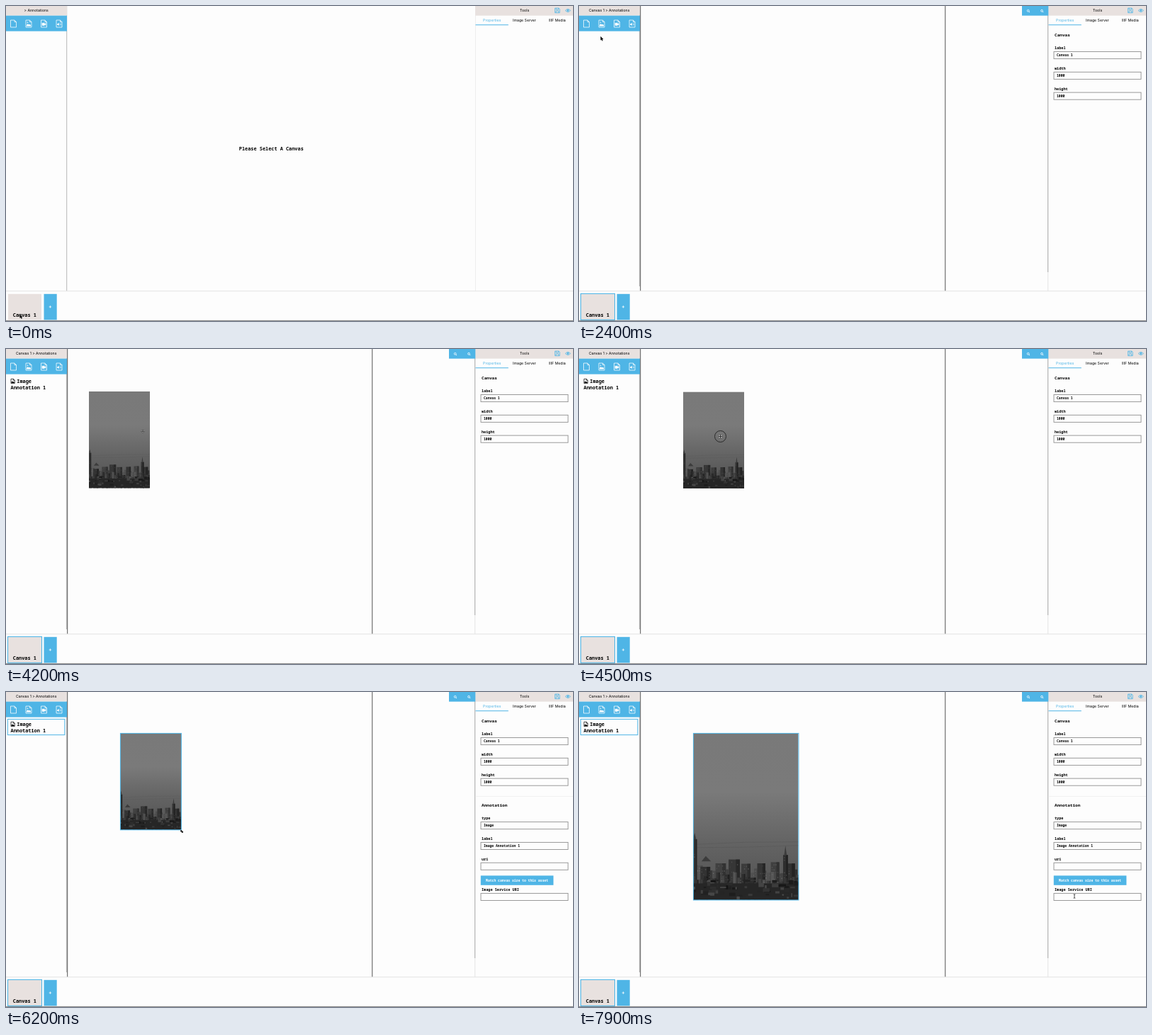
Recreate the animation shown at these times as an HTML page. Size 800 px wide and 445 px high, loop 8000 ms.

```html
<!DOCTYPE html>
<html lang="en">
<head>
<meta charset="utf-8">
<title>Canvas editor</title>
<style>
  html, body { margin: 0; width: 100%; height: 100%; overflow: hidden; background: #fdfdfd; }
  svg { display: block; }
  text { font-family: "Noto Sans Mono", "DejaVu Sans Mono", monospace; font-weight: 600; white-space: pre; }
  .ui { font: 400 5.2px Inter, Roboto, sans-serif; text-anchor: middle; }
  .big { font-size: 6.9px; }
  .head { font-size: 6.05px; }
  .label { font-size: 5.2px; }
  .value { font-size: 4.73px; }
  .mid { text-anchor: middle; }
  .blue { fill: #4fb5e6; }
  .bar { fill: #e8e1df; }
  .line { fill: none; stroke: #4fb5e6; }
  .icon { fill: none; stroke: #fff; stroke-width: .75; stroke-linejoin: round; }
  .solid { fill: #fff; stroke: none; }
  .box { fill: #fdfdfd; stroke: #8f8f8f; stroke-width: .9; }
</style>
</head>
<body>
<svg width="800" height="445" viewBox="0 0 800 445">
  <defs>
    <linearGradient id="sky" x1="0" y1="0" x2="0" y2="1">
      <stop offset="0" stop-color="#797979"/>
      <stop offset=".35" stop-color="#7a7a7a"/>
      <stop offset=".65" stop-color="#646464"/>
      <stop offset="1" stop-color="#505050"/>
    </linearGradient>
    <path id="file" d="M-4-5H1.5L4-2.5V5H-4ZM1.5-5V-2.5H4"/>
    <g id="lens"><circle r="1.4" cx="-.3" cy="-.3" fill="none" stroke="#fff" stroke-width=".8"/><path d="M.7.7L2 2" stroke="#fff" stroke-width=".9"/></g>
  </defs>
  <rect width="800" height="445" fill="#fdfdfd"/>

  <g id="idle">
    <rect x="85" width="1.2" height="402.5" fill="#c4c4c4"/>
    <rect x="662" width=".6" height="402.5" fill="#e4e4e4"/>
    <text class="big mid" x="374.3" y="204">Please Select A Canvas</text>
  </g>
  <g id="open">
    <rect x="84.8" width="1.2" height="396" fill="#bdbdbd"/>
    <rect x="86.1" width="1.1" height="402.5" fill="#636363"/>
    <rect x="516.2" width="1.1" height="402.5" fill="#636363"/>
    <rect x="661.2" width="1" height="376" fill="#a6a6a6"/>
    <rect x="661.4" y="376" width=".8" height="26.5" fill="#dedede"/>
  </g>

  <rect class="bar" width="86" height="13.6"/>
  <text class="ui" id="crumb" x="42.7" y="8.2"></text>
  <rect class="blue" y="13.6" width="86" height="22"/>
  <g class="icon">
    <use href="#file" x="10.5" y="25"/>
    <g transform="translate(32 25)"><use href="#file"/><path class="solid" d="M-3 3.6V2L-1.2 0L.3 1.6L1.5.6L3 2.2V3.6Z"/><circle class="solid" cx="-1.5" cy="-1.8" r=".8"/></g>
    <g transform="translate(53.5 25)"><use href="#file"/><path class="solid" d="M-2.8-1.2H.8V0L2.8-1.2V2.8L.8 1.6V2.8H-2.8Z"/></g>
    <g transform="translate(75 25)"><use href="#file"/><path class="solid" d="M-2.8 0H-1.6L-.2-1.4V3L-1.6 1.7H-2.8Z"/><path d="M1-.3Q1.8.8 1 2M2-.9Q3.2.8 2 2.6" stroke-width=".5"/></g>
  </g>

  <rect class="bar" x="662" width="138" height="13.6"/>
  <text class="ui" x="731.6" y="8.2">Tools</text>
  <g class="line" stroke-width=".8">
    <path d="M774.6 3H780L781.2 4.2V9.6H774.6ZM776.2 3V5.2H779.4V3M776 9.6V7H779.8V9.6"/>
    <path d="M789.2 6.4Q792.8 2.2 796.4 6.4Q792.8 10.4 789.2 6.4Z"/>
    <circle class="blue" cx="792.8" cy="6.3" r="1.1"/>
  </g>
  <text class="ui blue" x="685.7" y="22">Properties</text>
  <text class="ui" x="731.4" y="22">Image Server</text>
  <text class="ui" x="777.7" y="22">IIIF Media</text>
  <rect class="blue" x="662.5" y="26.2" width="46.3" height="1"/>

  <g id="canvasForm">
    <rect class="blue" x="625" width="37.3" height="13.6"/>
    <use href="#lens" x="634" y="7"/><use href="#lens" x="653.3" y="7"/>
  </g>
  <g id="noteForm">
    <rect x="662.5" y="147" width="137.5" height=".8" fill="#f0f0f0"/>
    <rect class="blue" x="669.8" y="259.4" width="102.6" height="13.4"/>
    <text class="value mid" x="721" y="268.1" fill="#fff">Match canvas size to this asset</text>
  </g>

  <g id="item">
    <path d="M7 42.3H10.5L12.3 44V48.5H7ZM10.4 42.4V44.2H12.2" fill="none" stroke="#000" stroke-width=".7"/>
    <path d="M7.6 47.9V46.8L8.8 45.6L9.8 46.6L10.5 46L11.7 47V47.9Z"/>
    <text class="big" x="15.3" y="47.7">Image</text>
    <text class="big" x="6.5" y="57">Annotation 1</text>
  </g>
  <rect id="itemFrame" class="line" x="2.4" y="38.4" width="80.4" height="22.2"/>

  <svg id="photo" viewBox="0 0 100 158.6" preserveAspectRatio="none"><rect width="100" height="159" fill="url(#sky)"/></svg>
  <rect id="photoFrame" class="line"/>

  <rect y="402.4" width="800" height=".8" fill="#dcdcdc"/>
  <rect y="443.9" width="800" height="1.1" fill="#8c8c8c"/>
  <rect class="bar" x="3" y="406.8" width="47" height="36.4"/>
  <rect id="thumbFrame" class="line" x="2.5" y="406.4" width="48" height="37" stroke-width="1.1"/>
  <text class="big mid" x="26.3" y="439.3">Canvas 1</text>
  <rect class="blue" x="53.5" y="406.8" width="18.2" height="36.6"/>
  <path d="M60.7 425H64.1M62.4 423.3V426.7" stroke="#fff" stroke-width=".8"/>

  <circle id="ring" fill="none" stroke="#222" stroke-width=".9"/>
  <g id="cursor" stroke-linejoin="round">
    <path id="arrow" d="M0 0V5.8L1.3 4.6L2.3 6.8L3.3 6.3L2.3 4.2H4Z" stroke="#fff" stroke-width=".5" paint-order="stroke"/>
    <g id="move" fill="none"><path d="M-2.5 0H2.5M0-2.5V2.5" stroke="#fff" stroke-width="1.8"/><path d="M-2.3 0H2.3M0-2.3V2.3M-1.7-.6L-2.4 0L-1.7.6M1.7-.6L2.4 0L1.7.6M-.6-1.7L0-2.4L.6-1.7M-.6 1.7L0 2.4L.6 1.7" stroke="#000" stroke-width=".8"/></g>
    <path id="resize" d="M-1.8-1.8H.6L-.2-1L1-.2L1.8-.6V1.8H-.6L.2 1L-1 .2L-1.8.6Z" stroke="#fff" stroke-width=".4" paint-order="stroke"/>
    <path id="beam" d="M-1.3-2.8Q0-2.8 0-2Q0-2.8 1.3-2.8M0-2V2M-1.3 2.8Q0 2.8 0 2Q0 2.8 1.3 2.8" fill="none" stroke="#000" stroke-width=".7"/>
  </g>
</svg>
<script>
const $ = id => document.getElementById(id);
const LOOP = 8000, STEP = 100, ROW = 28.8;

function set(el, attrs) {
  for (const k in attrs) el.setAttribute(k, attrs[k]);
}
function add(parent, tag, attrs, content = "") {
  const el = document.createElementNS("http://www.w3.org/2000/svg", tag);
  set(el, attrs);
  el.textContent = content;
  parent.append(el);
}
const show = (id, on) => { $(id).style.display = on ? "" : "none"; };

// Forms
function field(parent, y, name, value) {
  add(parent, "text", { class: "label", x: 671, y: y - 3.4 }, name);
  add(parent, "rect", { class: "box", x: 670, y, width: 123, height: 10.1 });
  add(parent, "text", { class: "value", x: 674, y: y + 6.8 }, value);
}
function form(parent, y, title, fields) {
  add(parent, "text", { class: "head", x: 671, y: y - 21.3 }, title);
  Object.keys(fields).forEach((name, i) => field(parent, y + i * ROW, name, fields[name]));
}
form($("canvasForm"), 64.5, "Canvas", { label: "Canvas 1", width: "1000", height: "1000" });
form($("noteForm"), 183.6, "Annotation", { type: "Image", label: "Image Annotation 1", uri: "" });
field($("noteForm"), 183.6 + 3.5 * ROW, "Image Service URI", "");

// City skyline
let seed = 11;
const rnd = (min, max) => min + (max - min) * (seed = seed * 16807 % 2147483647) / 2147483647;
function block(x, y, width, height, v) {
  add($("photo"), "rect", { x, y, width, height, fill: `rgb(${v},${v},${v})` });
}
function tower(x, y, w, v) {
  block(x, y, w, 159 - y, v);
  block(x + w * .65, y, w * .35, 159 - y, v - 14);
  for (let wy = y + 2; wy < 143; wy += 2.4)
    for (let wx = x + .8; wx < x + w - 1; wx += 1.8)
      if (rnd(0, 1) < .35) block(wx, wy, .9, 1.1, v + rnd(5, 35));
}
add($("photo"), "path", { d: "M0 106Q50 103 100 103.5M0 109Q50 109 100 107", fill: "none", stroke: "#585858", "stroke-width": .4 });
for (let x = -2; x < 100; x += 5) tower(x, rnd(126, 136), rnd(5, 8), rnd(58, 88));
for (let x = 7; x < 100; x += rnd(10, 16)) tower(x, rnd(120, 128), rnd(7, 11), rnd(48, 66));
tower(0, 101, 3.6, 52);
tower(85.5, 116, 4.5, 46);
add($("photo"), "path", { d: "M8 122L12 117L17 122ZM0 101L1.5 95L3 101ZM86.5 116L87.7 107L89 116Z", fill: "#3c3c3c" });
for (let x = -2; x < 100; x += 4) tower(x, rnd(132, 142), rnd(3, 6), rnd(40, 90));
block(0, 143, 100, 16, 38);
for (let i = 0; i < 60; i++) block(rnd(-3, 97), rnd(139, 156), rnd(1, 7), rnd(1, 4), rnd(18, 82));

// Pointer moves: start, end, x, y
const moves = [
  [100, 1200, 20, 416],
  [2000, 2640, 31, 22],
  [3300, 3800, 147.5, 65],
  [3900, 4500, 199.5, 123.5],
  [5400, 6200, 248, 197],
  [6300, 6900, 421.5, 290],
  [7200, 7900, 699, 288.5]
];
const clicks = [1250, 2750, 4500, 6850];

const part = (t, a, b) => Math.min(1, Math.max(0, (t - a) / (b - a)));
const easeOut = p => 1 - (1 - p) ** 3;
const easeBack = p => 1 + 2.7 * (p - 1) ** 3 + 1.7 * (p - 1) ** 2;

function pointer(t) {
  let x = 19.5, y = 435.5;
  for (const [a, b, toX, toY] of moves) {
    const p = easeOut(part(t, a, b));
    x += (toX - x) * p;
    y += (toY - y) * p;
  }
  return [x, y];
}

function cursorKind(t, x) {
  if (t >= 3500 && t < 5900) return "move";
  if (t >= 5900 && t < 6800) return "resize";
  return x > 670 ? "beam" : "arrow";
}

function draw(t) {
  const opened = t >= 1600, added = t >= 3000, selected = t >= 4900;
  for (const id of ["open", "canvasForm", "thumbFrame"]) show(id, opened);
  for (const id of ["item", "photo"]) show(id, added);
  for (const id of ["noteForm", "itemFrame", "photoFrame"]) show(id, selected);
  show("idle", !opened);
  $("crumb").textContent = (opened ? "Canvas 1 " : "") + "> Annotations";

  // The photo trails the pointer while dragged, then while resized
  const drag = part(t, 3900, 4640);
  const px = 87 + 74 * drag, py = 58 * easeBack(drag);
  const w = 86 + 62.5 * part(t, 6300, 7060), h = w * 1.586;
  set($("photo"), { x: px, y: py, width: w, height: h });
  set($("photoFrame"), { x: px + .4, y: py + .4, width: w, height: h });

  const [x, y] = pointer(t), kind = cursorKind(t, x);
  set($("cursor"), { transform: `translate(${x} ${y})` });
  for (const id of ["arrow", "move", "resize", "beam"]) show(id, id === kind);

  const click = clicks.find(c => t >= c && t <= c + 250);
  show("ring", click);
  if (click) set($("ring"), { cx: x, cy: y, r: Math.min(14, 8 + (t - click) * .03) });
}

const start = performance.now();
function tick() {
  const t = (performance.now() - start) % LOOP;
  draw(Math.floor(t / STEP) * STEP);
  requestAnimationFrame(tick);
}
tick();
</script>
</body>
</html>
```
